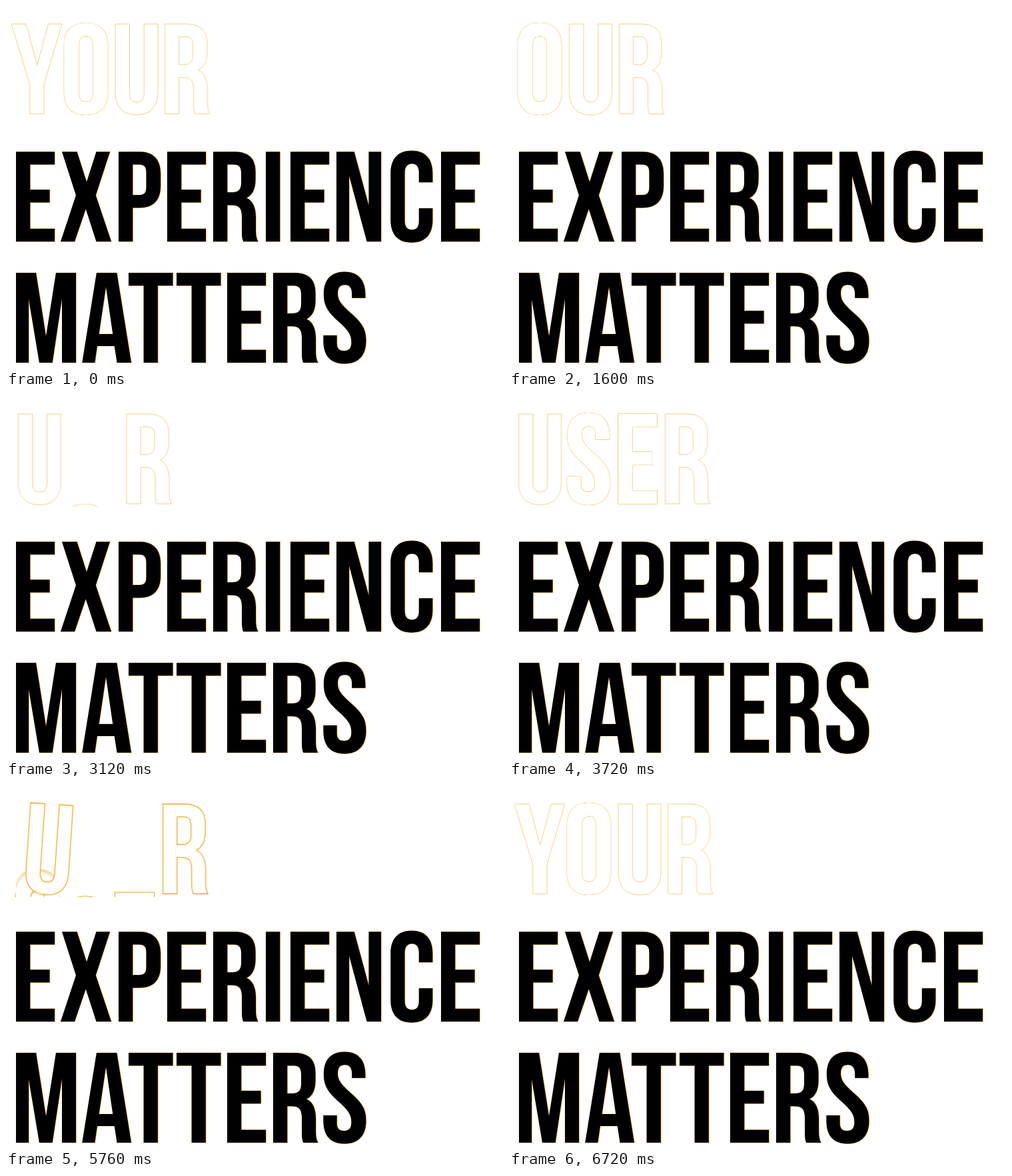
Write an HTML page without scripts that moves like this. It is 746x544 px and loops after 7760 ms.

```html
<!DOCTYPE html>
<html lang="en">
<head>
<meta charset="utf-8">
<title>Your experience matters</title>
<style>
html, body { margin: 0; width: 100%; height: 100%; overflow: hidden; background: #fff; }
svg { display: block; width: 746px; height: 544px; --amber: #f0a820; }

.rim { fill: var(--amber); stroke: var(--amber); stroke-width: .6px; }
.word { --swift: cubic-bezier(.87, 0, .13, 1); fill: #fff; stroke: var(--amber); animation: edge 7760ms linear infinite; }
.move, .pop, .lean, .fall use { animation: 7760ms var(--swift) infinite both; }
.pop, .lean { transform-box: fill-box; }
.pop { transform-origin: center; animation-name: pop; }
.lean { transform-origin: 50% 100%; animation-name: lean; animation-timing-function: ease-in-out; }

.o { animation-name: slideO; }
.u { animation-name: slideU; }
.r { animation-name: slideR; }
.dropO use { animation-name: dropO; }
.dropS use { animation-name: dropS; }
.dropE use { animation-name: dropE; }

/* layers that trail each other give the motion blur */
.line { animation: underEdge 7760ms linear infinite; }
.tint { fill: var(--amber); stroke: none; }
.body { fill-opacity: .6; stroke: none; }
.fall use { animation-delay: var(--lag, 0ms); }
.fall use:nth-child(1) { --lag: 6ms; }
.fall use:nth-child(2) { --lag: 3.6ms; }
.fall use:nth-child(3) { --lag: 1.2ms; }
.fall use:nth-child(4) { --lag: -1.2ms; }
.fall use:nth-child(5) { --lag: -3.6ms; }
.fall use:nth-child(6) { --lag: -6ms; }

@keyframes edge {
  0%, 6.5%, 17%, 72%, 78%, 100% { stroke-width: .55px; }
  9%, 13%, 74%, 75.5% { stroke-width: 1.3px; }
}
@keyframes underEdge {
  0%, 6.5%, 17%, 72%, 83%, 100% { stroke-width: 1.2px; }
  9%, 13%, 74%, 79% { stroke-width: 2.3px; }
}
@keyframes pop {
  0%, 5.155% { transform: none; }
  11.6%, 73.71% { transform: translateY(-24px) scale(0); }
  82.73%, 100% { transform: none; }
}
@keyframes slideO {
  0%, 5.67% { transform: translateX(87.5px); }
  15.98%, 72.55% { transform: translateX(13.5px); }
  82.86%, 100% { transform: translateX(87.5px); }
}
@keyframes slideU {
  0%, 5.8% { transform: translateX(164px); }
  16.11%, 36.08% { transform: translateX(90.5px); }
  41.75%, 71.65% { transform: translateX(14.5px); }
  79.38%, 100% { transform: translateX(164px); }
}
@keyframes slideR {
  0%, 6.77% { transform: translateX(238.5px); }
  17.07%, 36.6% { transform: translateX(165.5px); }
  44.85%, 71.65% { transform: translateX(234.5px); }
  77.32%, 100% { transform: translateX(238.5px); }
}
@keyframes lean {
  0%, 5.67% { transform: none; }
  12.37% { transform: rotate(-4.6deg); }
  17.01% { transform: rotate(1.5deg); }
  20.62%, 71.65% { transform: none; }
  75.5% { transform: rotate(5deg); }
  78.35% { transform: rotate(.8deg); }
  79.9%, 100% { transform: none; }
}
@keyframes dropO {
  0%, 32.99% { transform: none; }
  39.18%, 72.16% { transform: translateY(142px); }
  76.8%, 100% { transform: none; }
}
@keyframes dropS {
  0%, 38.66% { transform: translateY(142px); }
  45.36%, 70.1% { transform: none; }
  74.74%, 100% { transform: translateY(142px); }
}
@keyframes dropE {
  0%, 39.95% { transform: translateY(142px); }
  46.91%, 70.88% { transform: none; }
  75.52%, 100% { transform: translateY(142px); }
}
</style>
</head>
<body>
<svg viewBox="0 0 746 544" role="img" aria-label="Your / our / user experience matters">
<defs>
  <path id="A" fill-rule="evenodd" d="M21.6 0H52L73.7 135H52.3L48.4 110H22.6L19 135H0ZM25.2 92H46L35.7 21Z"/>
  <path id="C" d="M63 85V102.3C63 124 52.5 136.5 31.5 136.5S0 124 0 102.3V32.7C0 11 10.5-1.5 31.5-1.5S63 11 63 32.7V46H42.5V31.5C42.5 22 38.3 18 32 18S21.2 22 21.2 31.5V104C21.2 113.5 25.3 117.2 32 117.2S42.5 113.5 42.5 104V85Z"/>
  <path id="E" d="M0 0H58V19.3H21.2V57H50.5V76.3H21.2V115.7H58V135H0Z"/>
  <path id="I" d="M0 0H21.2V135H0Z"/>
  <path id="M" d="M0 0H30L45 95.5L60 0H90V135H69V38.5L54.6 135H35L19 39.5V135H0Z"/>
  <path id="N" d="M0 0H26.6L48.5 81V0H67V135H45.6L19 36V135H0Z"/>
  <path id="O" fill-rule="evenodd" d="M32.5-1.5C54-1.5 65 11 65 32.7V102.3C65 124 54 136.5 32.5 136.5S0 124 0 102.3V32.7C0 11 11-1.5 32.5-1.5ZM32.5 18C25.5 18 21.5 22 21.5 31.5V104C21.5 113.5 25.5 117.2 32.5 117.2S43.5 113.5 43.5 104V31.5C43.5 22 39.5 18 32.5 18Z"/>
  <path id="P" fill-rule="evenodd" d="M0 0H31.3C52 0 63 11.5 63 32.5V51.8C63 73 52 84.3 31.3 84.3H21.2V135H0ZM21.2 19.3V65H31.3C38 65 41.5 62 41.5 53V31C41.5 22.5 38 19.3 31.3 19.3Z"/>
  <path id="R" fill-rule="evenodd" d="M0 0H31.5C53.3 0 63.5 10.2 63.5 30.2V41.2C63.5 56 58.5 65.5 50 69.5C59.5 73.5 64 84 64 99.3V118C64 125 64.7 130 67.3 135H45.3C43.8 131.5 43 129 43 118.3V97.5C43 84.5 38.3 80.3 27.5 80.3H21.2V135H0ZM21.2 19.3V61H29C37 61 42 57.5 42 47V32C42 23 38.5 19.3 31.3 19.3Z"/>
  <path id="S" d="M0 94H20.2V106C20.2 114.5 24.5 117.2 30.8 117.2C37.5 117.2 42 114 42 104.5C42 93 37.5 86.5 23 73.5C5 57.5.5 47.5.5 32C.5 10.7 11-1.5 31.7-1.5S63 11 63 32.7V37.8H42.8V31.3C42.8 22 38.5 18 32.3 18C25.5 18 21.5 21.5 21.5 31C21.5 40.5 26 47 40 59.5C59 75.7 64 85.5 64 102C64 124 53 136.5 31.7 136.5S0 124.3 0 102.5Z"/>
  <path id="T" d="M0 0H66.4V19.3H43.8V135H22.6V19.3H0Z"/>
  <path id="U" d="M0 0H21.5V104C21.5 113.5 25.5 117.2 32.3 117.2S43.3 113.5 43.3 104V0H64V102.5C64 124 53 136.5 32 136.5S0 124 0 102.5Z"/>
  <path id="X" d="M2 0H24.5L39 45.5L53.5 0H74L52.7 65.5L76 135H53.5L37.7 86L21 135H0L23 65.5Z"/>
  <path id="Y" d="M0 0H22L38.8 61.5L55.5 0H76L49 91V135H27.8V91Z"/>

  <g id="rows">
    <g transform="translate(0 219)">
      <use href="#E" x="15"/><use href="#X" x="82"/><use href="#P" x="169"/><use href="#E" x="242"/><use href="#R" x="311"/>
      <use href="#I" x="390"/><use href="#E" x="427"/><use href="#N" x="496"/><use href="#C" x="577.3"/><use href="#E" x="653"/>
    </g>
    <g transform="translate(0 401)">
      <use href="#M" x="15"/><use href="#A" x="114.3"/><use href="#T" x="184"/><use href="#T" x="256"/>
      <use href="#E" x="332"/><use href="#R" x="401"/><use href="#S" x="476.4"/>
    </g>
  </g>
  <clipPath id="slot"><path d="M0 24H320V167H0Z"/></clipPath>
</defs>

<use class="rim" href="#rows" x=".4"/>
<use href="#rows"/>

<g clip-path="url(#slot)">
  <g class="word" transform="translate(0 27)">
    <g transform="translate(8 0)"><use class="pop" href="#Y"/></g>
    <g class="move o">
      <g class="fall dropO line"><use href="#O"/></g>
      <g class="fall dropO tint"><use href="#O"/><use href="#O"/><use href="#O"/><use href="#O"/><use href="#O"/><use href="#O"/></g>
      <g class="fall dropO body"><use href="#O"/><use href="#O"/><use href="#O"/><use href="#O"/><use href="#O"/><use href="#O"/></g>
    </g>
    <g transform="translate(87.5 0)">
      <g class="fall dropS line"><use href="#S"/></g>
      <g class="fall dropS tint"><use href="#S"/><use href="#S"/><use href="#S"/><use href="#S"/><use href="#S"/><use href="#S"/></g>
      <g class="fall dropS body"><use href="#S"/><use href="#S"/><use href="#S"/><use href="#S"/><use href="#S"/><use href="#S"/></g>
    </g>
    <g transform="translate(164 0)">
      <g class="fall dropE line"><use href="#E"/></g>
      <g class="fall dropE tint"><use href="#E"/><use href="#E"/><use href="#E"/><use href="#E"/><use href="#E"/><use href="#E"/></g>
      <g class="fall dropE body"><use href="#E"/><use href="#E"/><use href="#E"/><use href="#E"/><use href="#E"/><use href="#E"/></g>
    </g>
    <g class="move u"><use class="lean" href="#U"/></g>
    <g class="move r"><use href="#R"/></g>
  </g>
</g>
</svg>
</body>
</html>
```
